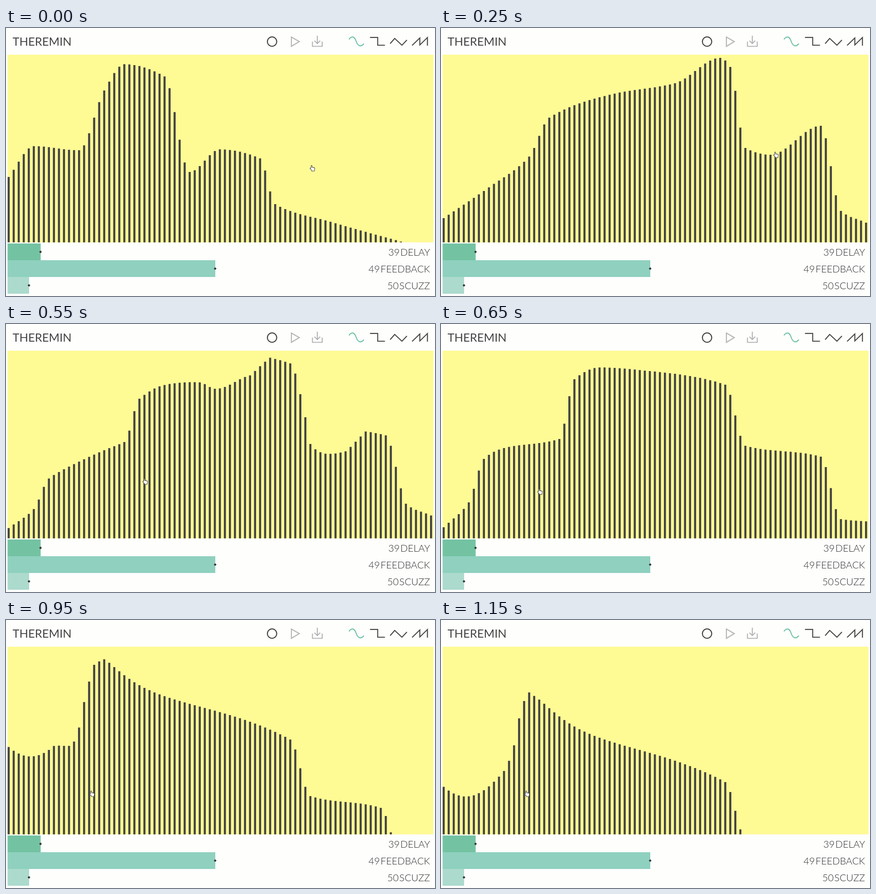
Animation of 947 by 592 pixels, one loop 1.2 s. Source, as an HTML page:

```html
<!DOCTYPE html>
<html lang="en">
<head>
<meta charset="utf-8">
<title>Theremin</title>
<style>
  html, body { margin: 0; width: 100%; height: 100%; overflow: hidden; background: #fefefd; }
  svg { display: block; width: 947px; height: 592px; }
  text { font-family: Lato, "Open Sans", sans-serif; fill: #444; }
  .label { font-size: 21.6px; font-weight: 300; text-anchor: end; word-spacing: -4.4px; fill: #2c2c2c; }
  .icon { fill: none; stroke: #444; stroke-width: 2.2; }
  .off { stroke: #b4b4b4; }
  .on { stroke: #6cc3a6; }
</style>
</head>
<body>
<svg viewBox="0 0 947 592">
  <text x="14.5" y="39.3" font-size="25.5">THEREMIN</text>
  <g class="icon">
    <circle cx="587.3" cy="30" r="10.3"/>
    <path class="off" d="M630 20L647.5 30L630 40.5Z"/>
    <path class="off" d="M676.5 30V40.5H698V30M687.2 17V34M681 28L687.2 34.5L693.5 28"/>
    <path class="on" d="M757 25C763 17 769 18 773 29.5S784 42 790 34.5"/>
    <path d="M803.5 20.8H820.5V38H836.5"/>
    <path d="M848 34.5L858 23L874 38L885 26.5"/>
    <path d="M896.5 38.5L913.5 22V37.5L930.3 21V39"/>
  </g>
  <rect x="3.5" y="59" width="940" height="414.5" fill="#fefa94"/>
  <path id="bars" stroke="#444" stroke-width="4.6"/>
  <g id="sliders"></g>
  <path id="hand" fill="#fff" stroke="#444" stroke-width="1.1" stroke-linejoin="round"
    d="M-3-1V-5.3a1.1 1.1 0 0 1 2.2 0V-2.4l4.4.8q1.9.5 1.6 2.5l-.8 3V6H-1.6V4.6L-5 .9q-.9-1.8 1.2-1.5z"/>
</svg>
<script>
const LOOP = 1200, STEP = 50, BARS = 85, FLOOR = 473.5, DECAY = 0.47;

const sliders = [
  [39, 'DELAY', 76.5, '#73c3a3'],
  [49, 'FEEDBACK', 462, '#8fd0be'],
  [50, 'SCUZZ', 51, '#acdacd']
];
document.getElementById('sliders').innerHTML = sliders.map(([value, name, end, fill], i) => {
  const y = 476 + 37 * i;
  return `<rect x="3.5" y="${y}" width="${end - 3.5}" height="37" fill="${fill}"/>
    <path d="M${end - 3.3} ${y + 18.5}l3-3l3 3l-3 3z" fill="#333"/>
    <text class="label" x="936" y="${y + 26.7}">${value} ${name}</text>`;
}).join('');

// Smooth curve through a few points, without overshoot.
function curve(...pts) {
  const slope = pts.slice(1).map(([x, y], i) => (y - pts[i][1]) / (x - pts[i][0]));
  const tangent = pts.map((_, i) => {
    const a = slope[i - 1] ?? slope[i], b = slope[i] ?? a;
    return a * b > 0 ? 2 * a * b / (a + b) : 0;
  });
  return x => {
    let i = 0;
    while (i < pts.length - 2 && x >= pts[i + 1][0]) i++;
    const w = pts[i + 1][0] - pts[i][0], p = (x - pts[i][0]) / w, q = 1 - p;
    return pts[i][1] * (1 + 2 * p) * q * q + pts[i + 1][1] * p * p * (3 - 2 * p)
      + w * p * q * (tangent[i] * q - tangent[i + 1] * p);
  };
}

// Bar tops across the spectrum: [bar, top]
const start = curve([0, 329], [5, 261], [14, 270], [19, 138], [23, 80], [31, 107],
  [36, 318], [42, 268], [50, 288], [53, 389], [64, 428], [84, 490]);
const high = curve([0, 420], [9, 352], [17, 284], [21, 198], [34, 145], [46, 122],
  [55, 66], [57, 86], [60, 265], [65, 280], [75, 216], [79, 404], [84, 430]);
const twin = curve([0, 454], [9, 420], [21, 290], [38, 184], [41, 219], [48, 114],
  [55, 61], [57, 70], [60, 265], [63, 307], [75, 213], [79, 397], [84, 423]);
const broad = curve([0, 449], [5, 394], [8, 298], [12, 274], [23, 254], [26, 122],
  [31, 96], [41, 104], [56, 134], [60, 269], [75, 293], [79, 431], [84, 436]);
const low = curve([0, 270], [12, 278], [14, 247], [17, 99], [20, 85], [26, 97],
  [56, 195], [60, 320], [74, 346], [78, 456], [84, 475]);

// The note dies away: its peak lingers, then everything sinks together.
const fade = k => low(k) + (k < 16
  ? 75 * Math.cos((k - 4) * Math.PI / 18)
  : 116 * (1 - Math.exp((16 - k) / 6)));
const sink = share => k => fade(k) + share * (41 + Math.min(6, k / 8));

const shapes = [
  [0, start], [250, high], [450, twin], [650, broad], [800, low],
  [1050, fade], [1100, sink(0.32)], [1150, sink(1)]
];

const handX = curve([0, 676.5], [250, 739.5], [450, 443.5], [650, 218.5], [800, 190], [LOOP, 190]);
const handY = curve([0, 310], [250, 280.5], [450, 321], [650, 370.5], [800, 384], [LOOP, 384]);

// Bars rise fast; they hold, then fall at a steady rate.
function topAt(a, b, t, T) {
  if (b < a) return a + (b - a) * Math.pow(t / T, 0.6);
  const rate = Math.max(DECAY, (b - a) / T);
  return Math.max(a, b - rate * (T - t));
}

const bars = document.getElementById('bars');
const hand = document.getElementById('hand');

function draw(t) {
  let i = 0;
  while (i < shapes.length - 2 && t >= shapes[i + 1][0]) i++;
  const [t0, from] = shapes[i], [t1, to] = shapes[i + 1];
  let d = '';
  for (let k = 0; k < BARS; k++) {
    const top = topAt(from(k), to(k), t - t0, t1 - t0);
    if (top < FLOOR) d += `M${(5.9 + 11.1 * k).toFixed(1)} ${FLOOR}V${top.toFixed(1)}`;
  }
  bars.setAttribute('d', d);
  hand.setAttribute('transform', `translate(${handX(t).toFixed(1)} ${handY(t).toFixed(1)})`);
}

const begin = performance.now();
function tick() {
  const t = (performance.now() - begin) % LOOP;
  draw(Math.floor(t / STEP) * STEP);
  requestAnimationFrame(tick);
}
tick();
</script>
</body>
</html>
```
